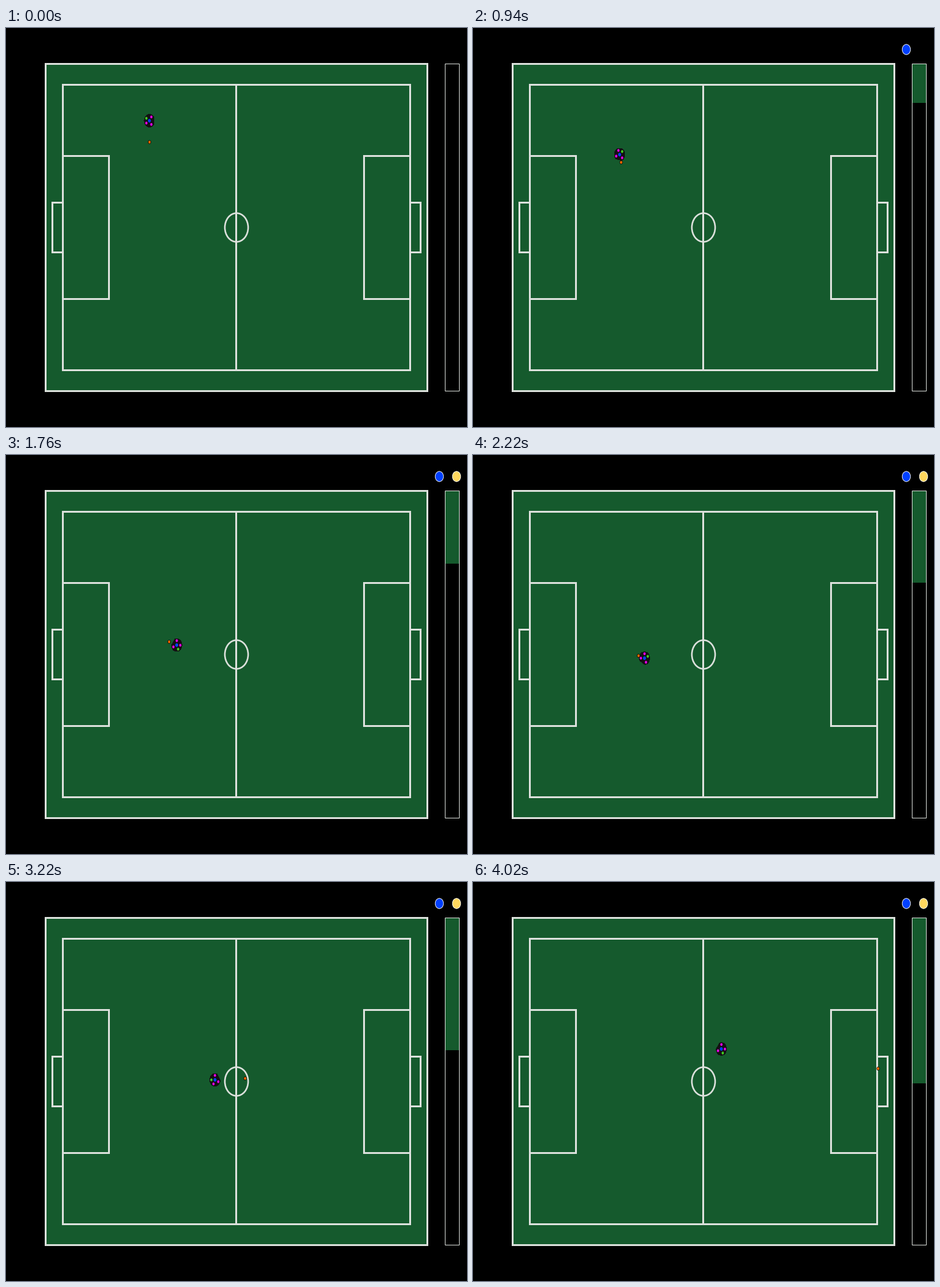
Recreate the animation shown at these times as a matplotlib script. Size 750 by 650 pixels, loop 4070 ms.

```python
import numpy as np
import matplotlib.pyplot as plt
from matplotlib.animation import FuncAnimation
from matplotlib.patches import Ellipse, Polygon, Rectangle

W, H, DPI = 750, 650, 100
PX = 72 / DPI
SQUEEZE = 0.81            # horizontal / vertical scale of the view
FRAMES, INTERVAL, LAST_STEP = 407, 10, 201
EPISODE = 400             # steps in a full gauge

GREEN, LINE, BLACK = "#155a2d", "#dce1dc", "#000000"
BLUE, MAGENTA, LIME = "#0040ff", "#ea00ea", "#40d020"
ORANGE, YELLOW, BODY = "#ff6a00", "#ffd75e", "#141014"

# step, x, y, heading in degrees (clockwise on screen)
ROBOT = [(0, 233.3, 151, 0), (27, 230.5, 173.5, 80), (47, 238.5, 206.3, 103),
         (66, 274.3, 268, 277), (111, 279, 331, 123), (130, 266, 322, 95),
         (144, 288.4, 316, 80), (161, 340, 322.3, -33), (201, 404, 272, -146)]

# step, x, y while dribbled; after the kick the ball rolls straight
DRIBBLE = [(0, 233.5, 185.8), (27, 233.5, 185.8), (47, 241, 218.8),
           (66, 257.3, 269.8), (111, 269.3, 327), (128, 258.5, 333),
           (144, 288, 328.8), (150, 314.8, 324.4)]
KICK_STEP, KICK_SPEED = 150, np.array([6.75, -0.4])


def glide(keys, s):
    """Monotone cubic through the keys."""
    keys = np.array(keys, float)
    t, p = keys[:, 0], keys[:, 1:]
    slope = np.diff(p, axis=0) / np.diff(t)[:, None]
    a, b = slope[:-1], slope[1:]
    same = a * b > 0
    inner = np.where(same, 2 * a * b / np.where(same, a + b, 1), 0)
    m = np.vstack([slope[:1], inner, slope[-1:]])
    i = np.clip(np.searchsorted(t, s, side="right") - 1, 0, len(t) - 2)
    h = (t[i + 1] - t[i])[:, None]
    u = (s - t[i])[:, None] / h
    return ((1 + 2 * u) * (1 - u) ** 2 * p[i] + u * (1 - u) ** 2 * h * m[i]
            + u * u * (3 - 2 * u) * p[i + 1] + u * u * (u - 1) * h * m[i + 1])


steps = np.arange(LAST_STEP + 1)
robot_path = glide(ROBOT, steps)
ball_path = glide(DRIBBLE, np.minimum(steps, KICK_STEP))
ball_path += np.maximum(steps - KICK_STEP, 0)[:, None] * KICK_SPEED

fig = plt.figure(figsize=(W / DPI, H / DPI), dpi=DPI, facecolor=BLACK)
ax = fig.add_axes([0, 0, 1, 1])
ax.set(xlim=(0, W), ylim=(H, 0))
ax.axis("off")


def box(x0, y0, x1, y1, width=3, fill="none"):
    ax.add_patch(Rectangle((x0, y0), x1 - x0, y1 - y0, fc=fill, ec=LINE,
                           lw=width * PX, joinstyle="miter", snap=False))


def oval(x, y, r, fill, edge="none", width=0.0):
    return ax.add_patch(Ellipse((x, y), 2 * r * SQUEEZE, 2 * r, fc=fill,
                                ec=edge, lw=width * PX))


# pitch
box(64.5, 58.5, 685.5, 591.5, fill=GREEN)
box(92.5, 92.5, 657.5, 557.5)
ax.plot([374.5, 374.5], [92.5, 557.5], color=LINE, lw=3 * PX, snap=False)
oval(375, 325, 23.4, "none", LINE, 2.6)
for depth, top, bottom in ((75, 208.5, 441.5), (-17, 284.5, 365.5)):
    box(92.5, top, 92.5 + depth, bottom)
    box(657.5 - depth, top, 657.5, bottom)

# progress gauge and lamps
gauge = ax.add_patch(Rectangle((714.5, 58.5), 23, 0, fc=GREEN, ec="none"))
box(714.5, 58.5, 737.5, 591.5, width=1)
blue_lamp = oval(705, 35, 8.3, BLUE, "white", 0.9)
yellow_lamp = oval(733, 35, 8.3, YELLOW, "white", 0.9)

# robot: round body with a flat front, blue centre, four marker dots
arc = np.radians(np.linspace(36, 324, 40))
outline = 10.3 * np.column_stack([np.cos(arc), np.sin(arc)])
markers = np.array([(0, 0), (3.9, -6.1), (3.9, 6.1), (-6.1, 3.9), (-6.1, -3.9)])
body = ax.add_patch(Polygon(outline, fc=BODY, ec="none", antialiased=False))
dots = [oval(0, 0, 2.9 if c == BLUE else 2.3, c)
        for c in (BLUE, MAGENTA, MAGENTA, MAGENTA, LIME)]
ball = oval(0, 0, 2.7, ORANGE, BLACK, 0.7)


def place(points, x, y, heading):
    c, s = np.cos(np.radians(heading)), np.sin(np.radians(heading))
    turned = points @ np.array([[c, s], [-s, c]])
    return turned * (SQUEEZE, 1) + (x, y)


def update(i):
    s = min(i // 2, LAST_STEP)
    pose = robot_path[s]
    body.set_xy(place(outline, *pose))
    for dot, center in zip(dots, place(markers, *pose)):
        dot.set_center(center)
    ball.set_center(ball_path[s])
    gauge.set_height(533 * (s + 1) / EPISODE if s else 0)
    blue_lamp.set_visible(s > 0 and not 130 <= s < KICK_STEP)
    yellow_lamp.set_visible(s >= 74)
    return [body, *dots, ball, gauge, blue_lamp, yellow_lamp]


anim = FuncAnimation(fig, update, frames=FRAMES, interval=INTERVAL,
                     repeat=True, repeat_delay=0)
plt.show()
```
